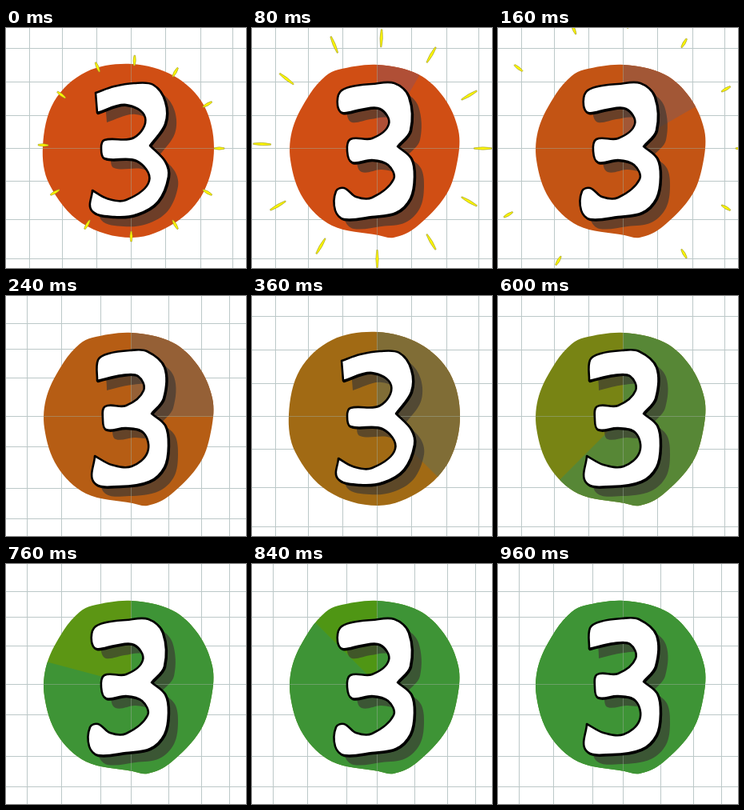
An HTML page with a canvas that plays this animation: 300 px wide and 300 px high, repeating every 1 s.

```html
<!DOCTYPE html>
<html lang="en">
<head>
<meta charset="utf-8">
<title>Countdown 3</title>
<style>
html, body { margin: 0; width: 100%; height: 100%; overflow: hidden; background: #fff; }
canvas { display: block; width: 300px; height: 300px; }
</style>
</head>
<body>
<canvas id="stage" width="300" height="300"></canvas>
<script>
const ctx = document.getElementById('stage').getContext('2d');
const LOOP = 1000, STEP = 40, CX = 156.5, CY = 150.5, TURN = Math.PI * 2;
const clamp = (x, lo, hi) => Math.max(lo, Math.min(hi, x));

// Closed smooth outline through "x,y x,y ..."; a repeated point makes a corner.
function outline(text) {
  const pts = text.split(' ').map(p => p.split(',').map(Number));
  const n = pts.length, at = i => pts[(i + n) % n];
  const dir = i => {
    const a = at(i - 1), b = at(i + 1), d = Math.hypot(b[0] - a[0], b[1] - a[1]) || 1;
    return [(b[0] - a[0]) / d, (b[1] - a[1]) / d];
  };
  const path = new Path2D();
  path.moveTo(...pts[0]);
  for (let i = 0; i < n; i++) {
    const a = at(i), b = at(i + 1), u = dir(i), v = dir(i + 1);
    const k = Math.hypot(b[0] - a[0], b[1] - a[1]) / 3;
    path.bezierCurveTo(a[0] + u[0] * k, a[1] + u[1] * k, b[0] - v[0] * k, b[1] - v[1] * k, b[0], b[1]);
  }
  path.closePath();
  return path;
}

const smoothDisc = outline('157,45 210,60 247,96 260,150 247,205 212,243 158,262 95,244 54,195 46,148 60,92 100,55');
const roughDisc = outline('157,46 208,58 240,87 258,128 257,165 243,208 205,249 177,262 158,259 100,247 64,213 48,165 51,125 72,83 92,60 108,52');

// Three hand-drawn versions of the digit, swapped to make it boil
const poses = {
  A: { disc: smoothDisc, digit: outline('112,81 112,81 135,73 160,69 184,71 199,92 199,120 180,147 180,147 199,167 203,186 190,217 164,233 135,236 107,228 108,203 108,203 126,213 150,215 179,191 163,166 123,163 119,150 123,140 160,137 174,112 150,96 114,106 114,106') },
  B: { disc: roughDisc, digit: outline('115,80 128,72 155,68 176,69 198,89 197,128 182,147 182,147 199,162 203,187 198,214 179,232 142,238 110,233 111,200 111,200 132,211 157,213 177,195 172,171 150,165 125,167 121,154 124,138 150,137 172,118 165,100 145,99 114,106 114,106') },
  D: { disc: roughDisc, digit: outline('110,80 125,73 150,70 178,69 196,86 198,128 182,148 182,148 199,163 203,186 198,213 180,231 150,236 115,239 104,228 105,204 115,200 130,211 150,212 177,189 170,171 150,165 125,168 119,154 123,139 150,138 171,120 160,101 136,102 113,106 107,97') }
};
const poseOrder = 'AADDDDBBBAAADDBBBBDDDDDBB';

const grids = {
  L: { v: [29, 70, 113, 156, 199, 243, 283], h: [25, 67, 109, 150, 191, 239, 288] },
  T: { v: [26, 69, 118, 156, 203, 244, 279], h: [34, 66, 102, 150, 188, 240, 278] }
};
const gridOrder = 'LLLLLTTTTLLLLLLLLTTTTTTTT';

function line(x0, y0, x1, y1) {
  ctx.beginPath();
  ctx.moveTo(x0, y0);
  ctx.lineTo(x1, y1);
  ctx.stroke();
}

function drawGrid({ v, h }) {
  ctx.lineWidth = 1;
  ctx.strokeStyle = '#bcc8c8';
  v.forEach(x => line(x + 0.5, 0, x + 0.5, 300));
  h.forEach(y => line(0, y + 0.5, 300, y + 0.5));
}

function drawDisc({ disc, digit }, t) {
  const fade = 0.172 * t, rise = 0.109 * t;
  ctx.save();
  ctx.clip(disc);
  ctx.fillStyle = `rgb(${clamp(223 - fade, 60, 208)},${clamp(67 + rise, 78, 150)},20)`;
  ctx.fillRect(0, 0, 300, 300);
  ctx.fillStyle = `rgb(${Math.max(62, 190 - fade)},${Math.min(148, 70 + rise)},54)`;
  ctx.beginPath();
  ctx.moveTo(CX, CY);
  ctx.arc(CX, CY, 150, -TURN / 4, TURN * (t / 960 - 1 / 4));
  ctx.fill();
  ctx.restore();

  ctx.save();
  ctx.translate(12, 12);
  ctx.fillStyle = 'rgba(58,55,52,.65)';
  ctx.fill(digit);
  ctx.restore();

  ctx.save();
  ctx.clip(disc);
  ctx.strokeStyle = 'rgba(160,175,160,.45)';
  line(CX, 0, CX, 300);
  line(0, CY, 300, CY);
  ctx.restore();
}

function drawDigit(digit) {
  ctx.lineJoin = 'round';
  ctx.fillStyle = ctx.strokeStyle = '#000';
  ctx.lineWidth = 2.6;
  ctx.save();
  ctx.translate(0.9, 0.9);
  ctx.fill(digit);
  ctx.stroke(digit);
  ctx.restore();
  ctx.fillStyle = '#fff';
  ctx.fill(digit);
  ctx.stroke(digit);
}

// Twelve rays burst outwards in the first steps, leaning apart at the upper left
function drawRays(i) {
  if (i > 4) return;
  const travel = i * (0.58 - 0.04 * i);
  const half = 11 * Math.sin(Math.PI * (i + 1.3) / 6.6);
  ctx.fillStyle = '#fff800';
  ctx.strokeStyle = '#9a9630';
  ctx.lineWidth = 0.6;
  for (let n = 0; n < 12; n++) {
    const even = n * TURN / 12;
    const angle = even + 0.15 * Math.max(0, Math.cos(even - TURN * 0.625)) ** 4;
    ctx.save();
    ctx.translate(CX, CY);
    ctx.rotate(angle);
    ctx.translate(110 + (28 - 6 * Math.cos(angle)) * travel, 0);
    ctx.beginPath();
    ctx.moveTo(-half, -0.7);
    ctx.quadraticCurveTo(0, -2.6, half, -0.8);
    ctx.lineTo(half, 0.8);
    ctx.quadraticCurveTo(0, 2.6, -half, 0.7);
    ctx.closePath();
    ctx.fill();
    ctx.stroke();
    ctx.restore();
  }
}

function draw(now) {
  const i = Math.floor(((now + 1) % LOOP) / STEP);
  const pose = poses[poseOrder[i]];
  ctx.fillStyle = '#fff';
  ctx.fillRect(0, 0, 300, 300);
  drawGrid(grids[gridOrder[i]]);
  drawDisc(pose, i * STEP);
  drawDigit(pose.digit);
  drawRays(i);
}

function tick(now) {
  draw(now);
  requestAnimationFrame(tick);
}
draw(0);
requestAnimationFrame(tick);
</script>
</body>
</html>
```
